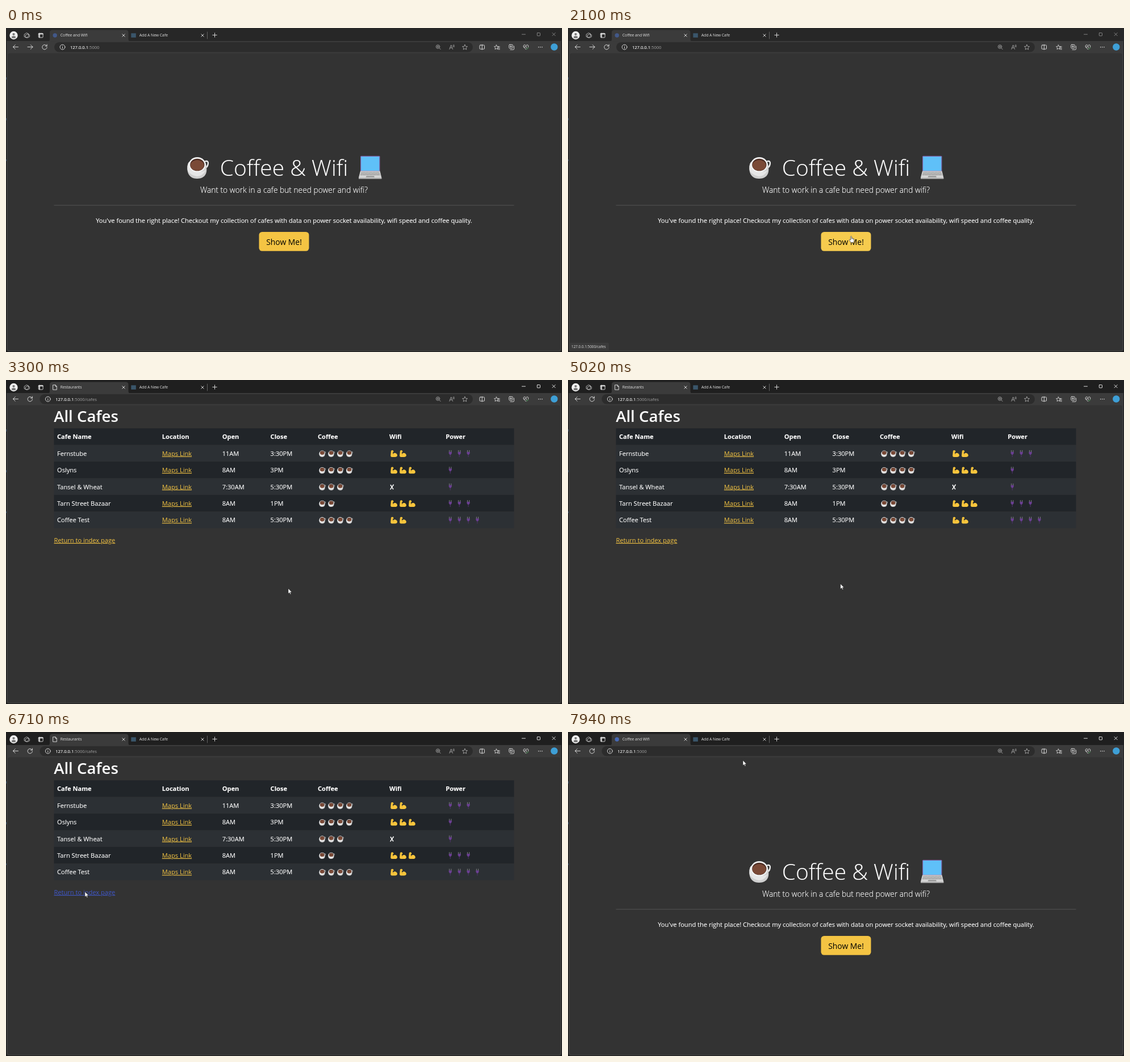
An HTML page that plays this animation: 979 px wide and 572 px high, repeating every 8000 ms.

```html
<!DOCTYPE html>
<html lang="en">
<head>
<meta charset="utf-8">
<title>Coffee and Wifi</title>
<style>
  html, body { margin: 0; width: 100%; height: 100%; overflow: hidden; background: #1c1c1c; }
  svg { display: block; width: 979px; height: 572px; font-family: "Open Sans", "Noto Sans", sans-serif; }
  text { fill: #fff; white-space: pre; }
  .body { font-size: 11.08px; stroke: #fff; stroke-width: .12; }
  .bold { font-weight: 700; }
  .link { fill: #f4c443; stroke: none; text-decoration: underline; }
  .mid { text-anchor: middle; }
  .light { font-weight: 300; stroke: #fff; stroke-width: .15; }
  .ui { font-size: 6.75px; fill: #e4e4e4; }
  .url { font-size: 7.6px; stroke: #fff; stroke-width: .1; }
  .dim { fill: #a2a2a2; stroke: none; }
  .ico { fill: none; stroke: #e6e6e6; stroke-width: .9; stroke-linecap: round; stroke-linejoin: round; }
  .soft { stroke: #a4a4a4; }
</style>
</head>
<body>
<svg viewBox="0 0 979 572" xmlns="http://www.w3.org/2000/svg">
  <defs>
    <g id="cup">
      <path d="M31 9.500Q37.500 7.500 36.500 14T29 22.500" fill="none" stroke="#ececec" stroke-width="2.400"/>
      <path d="M0 22Q0 12 4 10H31Q34 16 34 24C34 34 28 40 17 40S0 33 0 22Z" fill="#cfcfcf"/>
      <path d="M0 22Q0 12 4 10L14 26Q24 31 32 25Q28 35 17 36S0 33 0 22Z" fill="#e6e6e6"/>
      <ellipse cx="17.500" cy="15.300" rx="15" ry="13.300" fill="#f3f3f3"/>
      <ellipse cx="17.500" cy="15.500" rx="12.600" ry="10.800" fill="#4a2b22"/>
      <ellipse cx="17.300" cy="16.500" rx="11.800" ry="9.600" fill="#7a4936"/>
    </g>
    <g id="arm">
      <path d="M1 1.200Q3-.6 5 .8L5.400 3.200Q4.600 4 3.900 4L4.300 6.600Q6.200 4.400 8.800 5Q12 6.200 12 9.600Q11.400 12 8 12H2.600Q.2 12 .2 9.500Z" fill="#f8c63d"/>
      <path d="M4.300 6.600Q4.600 8.200 6 8.600M1.800 2.600H4" fill="none" stroke="#c98f22" stroke-width=".6"/>
    </g>
    <g id="plug">
      <path d="M1 0V3.500M4.200 0V3.500" stroke="#8d8d93" stroke-width=".9"/>
      <path d="M0 3H5.200V5.400L3.600 8H1.600L0 5.400Z" fill="#6b3f93"/>
      <path d="M2.600 7.500V12" stroke="#4d3268" stroke-width="1.100"/>
    </g>
    <path id="x" d="M-2.200-2.200L2.200 2.200M2.200-2.200L-2.200 2.200"/>
    <path id="star" d="M0-4.600L1.350-1.600 4.500-1.300 2.150.9 2.800 4.100 0 2.450-2.800 4.100-2.150.9-4.500-1.300-1.350-1.600Z"/>
    <path id="back" d="M4.500 0H-4.500M-.8-3.800L-4.600 0L-.8 3.800"/>
  </defs>

  <rect width="979" height="572" fill="#1c1c1c"/>
  <rect id="strip" width="979" height="24"/>
  <path d="M1 23H978V567Q978 571 974 571H5Q1 571 1 567Z" fill="#3b3b3b"/>
  <path d="M0 87V91M0 159V163M0 232V235" stroke="#35506e" stroke-width="2"/>
  <path d="M74 23.500Q77 23 77 20V8Q77 3.500 82 3.500H211Q215.500 3.500 215.500 8V20Q215.500 23 218.500 23.500Z" fill="#3b3b3b"/>
  <rect x="2.500" y="44" width="974" height="526" rx="4" fill="#333" stroke="#414141" stroke-width=".7"/>

  <!-- tab strip -->
  <circle cx="13.500" cy="13" r="7.200" fill="#f0f0f0"/>
  <circle cx="13.500" cy="11" r="2.100" fill="#777"/>
  <path d="M9.700 17Q9.700 14 13.500 14T17.300 17Q13.500 19.500 9.700 17Z" fill="#777"/>
  <g class="ico">
    <path d="M32.500 11L36 8.700 39.500 10V15L36 17.300 32.500 15.500ZM34.500 12.500L38 10.700 41.500 12V15.500L38 17.300 34.500 16Z" stroke-width=".7"/>
    <rect x="57.300" y="9.300" width="7.800" height="7.600" rx="1.200"/>
    <path d="M57.500 10.500H65M59 11V16.500" stroke-width="1.600"/>
    <use href="#x" x="207" y="13"/>
    <use href="#x" x="346" y="13"/>
    <path d="M354.500 7V19" stroke="#6a6a6a"/>
    <path d="M363.800 12.500H371.200M367.500 8.800V16.200"/>
  </g>
  <circle id="mark" cx="86.200" cy="13" r="3.700" fill="#4769b4"/>
  <path id="doc" class="ico" d="M83 8.800H87L89.300 11.200V17.200H83ZM87 8.800V11.300H89.300"/>
  <rect x="220.300" y="9.300" width="8.500" height="7.500" fill="#3a566b"/>
  <text id="tab" class="ui" x="95.800" y="15.300"></text>
  <text class="ui" x="234.800" y="15.300">Add A New Cafe</text>
  <g id="buttons" class="ico">
    <path d="M908.500 11.200H914.500"/>
    <rect x="935.300" y="8.600" width="5.200" height="5.200" rx=".7"/>
    <path d="M962 8.500L967.200 13.700M967.200 8.500L962 13.700"/>
  </g>

  <!-- toolbar -->
  <rect id="pill" y="25" height="17.500" rx="8.700" fill="#2c2c2c"/>
  <g class="ico">
    <use href="#back" x="17" y="33.500"/>
    <use id="fwd" href="#back" transform="translate(42.500 33.500) scale(-1 1)"/>
    <path id="reload" d="M3.800-1.600A4.200 4.200 0 1 0 4.200 .6M4.100-4.400V-1.500H1.200"/>
    <path id="stop" d="M64.800 30.300L71.200 36.700M71.200 30.300L64.800 36.700" stroke="#d8c7a0"/>
    <g id="info"><circle cy="33.700" r="4.400"/><path d="M0 33.300V36M0 31.500V31.600"/></g>
    <g class="soft">
      <circle cx="760.500" cy="33" r="3.200"/><path d="M763 35.500L765.200 37.700M759 33H762M760.500 31.500V34.500"/>
      <path d="M780.800 37.500L783.700 30L786.600 37.500M781.800 35H785.600M787 30.500Q788 31.500 787.300 33M788.500 29.500Q790 31.500 788.800 33.800"/>
      <use href="#star" x="808" y="34"/>
    </g>
    <rect x="834" y="30.200" width="8.500" height="7" rx="1.200"/><path d="M838.300 29.300V38.200"/>
    <use href="#star" transform="translate(863.500 34) scale(.88)"/>
    <path d="M866 33H869.300M866.500 35.400H869.300M867 37.700H869.300"/>
    <rect x="885.800" y="29.300" width="6.500" height="6.500" rx="1.200"/>
    <path d="M888 38.300H893Q894.600 38.300 894.600 36.700V32M889 31V34.200M887.400 32.600H890.600"/>
    <path d="M915.500 37.800L911.500 33.800Q910.300 31.500 912 30.200T915.500 31.200Q917.300 29 919 30.200T919.500 33.600"/>
    <path d="M912.500 33.500H914.500L915.500 32 916.800 34.800"/>
    <path d="M916 36L917.300 37.300 920 34.500" stroke="#58b36b"/>
    <path d="M937.700 33.700H937.800M940.800 33.700H940.900M943.900 33.700H944" stroke-width="1.500"/>
  </g>
  <circle cx="965.300" cy="33.500" r="6.200" fill="#3e9fd6"/>
  <text id="url" class="url" y="36.500">127.0.0.1<tspan id="path" class="dim"></tspan></text>

  <g id="home">
    <use href="#cup" x="319.300" y="226"/>
    <text class="mid light" x="489.500" y="261.300" font-size="39">Coffee &amp; Wifi</text>
    <g id="laptop">
      <rect x="624" y="225.700" width="34.500" height="27.500" rx="1.500" fill="#7d62a8"/>
      <rect x="625.200" y="227" width="32.100" height="25" fill="#5fc0f8"/>
      <path d="M624 252.500H658.500L661.300 264V266.300H621V264Z" fill="#d4d4d4"/>
      <path d="M621 264.500H661.300V266.300H621Z" fill="#b0b0b0"/>
      <path d="M625.500 254.600H657.500M624.800 257H658.200M624.200 259.300H658.800" stroke="#8a8a8a" stroke-width="1.400" stroke-dasharray="1.700 .7"/>
      <path d="M634.500 261.300H648L649 263.600H633.500Z" fill="#929292"/>
    </g>
    <text class="mid light" x="489.500" y="290.700" font-size="13.750">Want to work in a cafe but need power and wifi?</text>
    <path d="M84.500 313H894.500" stroke="#595959" stroke-width=".9"/>
    <text class="body mid" x="489.500" y="343.700">You've found the right place! Checkout my collection of cafes with data on power socket availability, wifi speed and coffee quality.</text>
    <rect id="btn" x="445.500" y="360" width="88" height="33.800" rx="5.500"/>
    <text class="mid" x="489.500" y="382.600" font-size="13.900" style="fill:#000">Show Me!</text>
  </g>

  <g id="list">
    <text x="84.200" y="74" font-size="27.600" font-weight="600">All Cafes</text>
    <g id="table"></g>
    <text id="ret" class="body link" x="84.500" y="286.800">Return to index page</text>
  </g>

  <g id="status">
    <path id="statusBox" fill="#3b3b3b"/>
    <text id="statusText" x="6" y="564.700" font-size="6.350" style="fill:#dcdcdc"></text>
  </g>

  <path id="arrow" d="M0 0V9.300L2.200 7.300 3.600 10.400 5 9.800 3.600 6.800H6.400Z" fill="#fff" stroke="#111" stroke-width=".5"/>
  <g id="hand">
    <path d="M-.9 .8Q0-.8 .9 .8V4Q1.800 3.300 2.400 4.200 3.400 3.700 3.900 4.600 5.300 4.400 5.200 6V8.300Q5 10.500 4.200 11.500H-.5Q-1.500 9.600-3.200 7.400-3.400 6-2.100 6.200L-.9 7.200Z" fill="#fff" stroke="#111" stroke-width=".6"/>
    <path d="M.9 4V6M2.400 4.500V6.200M3.900 4.800V6.400" stroke="#111" stroke-width=".4"/>
  </g>
</svg>
<script>
const $ = id => document.getElementById(id);
const show = (id, on) => $(id).setAttribute('display', on ? 'inline' : 'none');
const set = (id, attrs) => { for (const k in attrs) $(id).setAttribute(k, attrs[k]); };
const write = (id, s) => { if ($(id).textContent !== s) $(id).textContent = s; };

const cols = [90, 274.8, 380.7, 465.6, 549, 675, 774.3];
const head = ['Cafe Name', 'Location', 'Open', 'Close', 'Coffee', 'Wifi', 'Power'];
// name, open, close, cups, arms, plugs
const cafes = [
  ['Fernstube', '11AM', '3:30PM', 4, 2, 3],
  ['Oslyns', '8AM', '3PM', 4, 3, 1],
  ['Tansel & Wheat', '7:30AM', '5:30PM', 3, 0, 1],
  ['Tarn Street Bazaar', '8AM', '1PM', 2, 3, 3],
  ['Coffee Test', '8AM', '5:30PM', 4, 2, 4]
];
const rowH = 29.4, top0 = 85.3;

const cell = (s, x, y, cls = '') =>
  `<text class="body ${cls}" x="${x}" y="${y}">${s.replace('&', '&amp;')}</text>`;
const icons = (id, n, x, y, scale = 1) => Array.from({ length: n }, (_, i) =>
  `<use href="#${id}" transform="translate(${x + i * 15.9} ${y}) scale(${scale})"/>`).join('');
const band = i =>
  `<rect x="84.500" y="${top0 + i * rowH}" width="810" height="${rowH}" fill="${i % 2 ? '#2c3034' : '#212529'}"/>`;

function tableMarkup() {
  let out = band(0) + head.map((h, i) => cell(h, cols[i], 104.3, 'bold')).join('');
  cafes.forEach(([name, open, close, cups, arms, plugs], r) => {
    const y = 104.3 + (r + 1) * rowH, up = y - 9.8;
    out += band(r + 1) + cell(name, cols[0], y) + cell('Maps Link', cols[1], y, 'link')
      + cell(open, cols[2], y) + cell(close, cols[3], y)
      + icons('cup', cups, 551.5, up, .3) + icons('plug', plugs, 779.7, up);
    out += arms ? icons('arm', arms, 677, up)
      : `<path d="M677 ${y - 7.5}L682 ${y + .6}M682.600 ${y - 8}L676.600 ${y + .8}" stroke="#fff" stroke-width="1.500"/>`;
  });
  return out;
}
$('table').innerHTML = tableMarkup();

// pointer hotspot: time, x, y
const track = [
  [130, 938, 566], [330, 895, 470], [560, 780, 372], [720, 715, 357], [890, 685, 366],
  [960, 655, 372], [1100, 545, 380], [1230, 512, 378], [1450, 505, 371], [1710, 500, 366.5],
  [2040, 499, 367], [2300, 497, 368], [4950, 497, 368], [5020, 480, 359.5], [5090, 460, 379],
  [5380, 460, 379], [5500, 360, 350], [5640, 190, 296], [5770, 139, 282], [6730, 139, 282],
  [6900, 180, 294], [7120, 214, 298], [7460, 214, 298], [7600, 258, 215], [7780, 315, 90], [7940, 308, 50]
];
function pointer(t) {
  const i = track.findIndex(k => k[0] > t);
  if (i < 0) return track[track.length - 1].slice(1);
  const [t0, x0, y0] = track[Math.max(0, i - 1)], [t1, x1, y1] = track[i];
  const p = t1 > t0 ? (t - t0) / (t1 - t0) : 0;
  return [x0 + (x1 - x0) * p, y0 + (y1 - y0) * p];
}

const within = (t, a, b) => t >= a && t < b;
const fade = (t, a) => Math.min(1, Math.max(0, (t - a) / 120));

function draw(t) {
  const focus = t >= 3100, list = within(t, 3290, 6840);
  const early = t < 3290, loading = within(t, 3160, 3290);

  $('strip').setAttribute('fill', focus ? '#1f1f1f' : '#272727');
  $('buttons').style.stroke = focus ? '#f2f2f2' : '#8d8d8d';
  show('mark', !list && !loading && !within(t, 6840, 7000));
  set('mark', { opacity: focus ? 1 : .65 });
  show('doc', list);
  write('tab', list ? 'Restaurants' : 'Coffee and Wifi');

  const shift = early ? 25.7 : 0;
  set('pill', { x: 59.3 + shift, width: 762.7 - shift });
  set('info', { transform: `translate(${73.8 + shift} 0)` });
  set('url', { x: 87.2 + shift });
  write('path', list ? ':5000/cafes' : ':5000');
  show('fwd', early);
  show('stop', loading);
  show('reload', !loading);
  set('reload', { transform: `translate(${42.3 + shift} 33.5)` });

  show('home', !list);
  show('list', list);
  const hover = within(t, 1090, 3290);
  set('btn', { fill: t >= 3100 && hover ? '#f4d258' : hover ? '#f6cb4e' : '#f4c443' });
  $('ret').style.fill = t >= 6640 ? '#3f57c9' : t >= 5700 ? '#f6d25e' : '#f4c443';

  const first = within(t, 1300, 3160), second = within(t, 5960, 6640);
  show('status', first || second);
  if (first || second) {
    const right = first ? 72 : 54;
    write('statusText', '127.0.0.1:5000' + (first ? '/cafes' : ''));
    set('statusBox', { d: `M3 555.5H${right - 3}Q${right} 555.5 ${right} 558.5V569.5H6Q3 569.5 3 566.5Z` });
    set('status', { opacity: fade(t, first ? 1300 : 5960) });
  }

  const [x, y] = pointer(t);
  const hand = within(t, 1090, 3160) || within(t, 5700, 6660);
  show('arrow', t >= 130 && !hand);
  show('hand', hand);
  set(hand ? 'hand' : 'arrow', { transform: `translate(${x} ${y})` });
}

const start = performance.now();
function tick() {
  draw((performance.now() - start) % 8000);
  requestAnimationFrame(tick);
}
draw(0);
requestAnimationFrame(tick);
</script>
</body>
</html>
```
